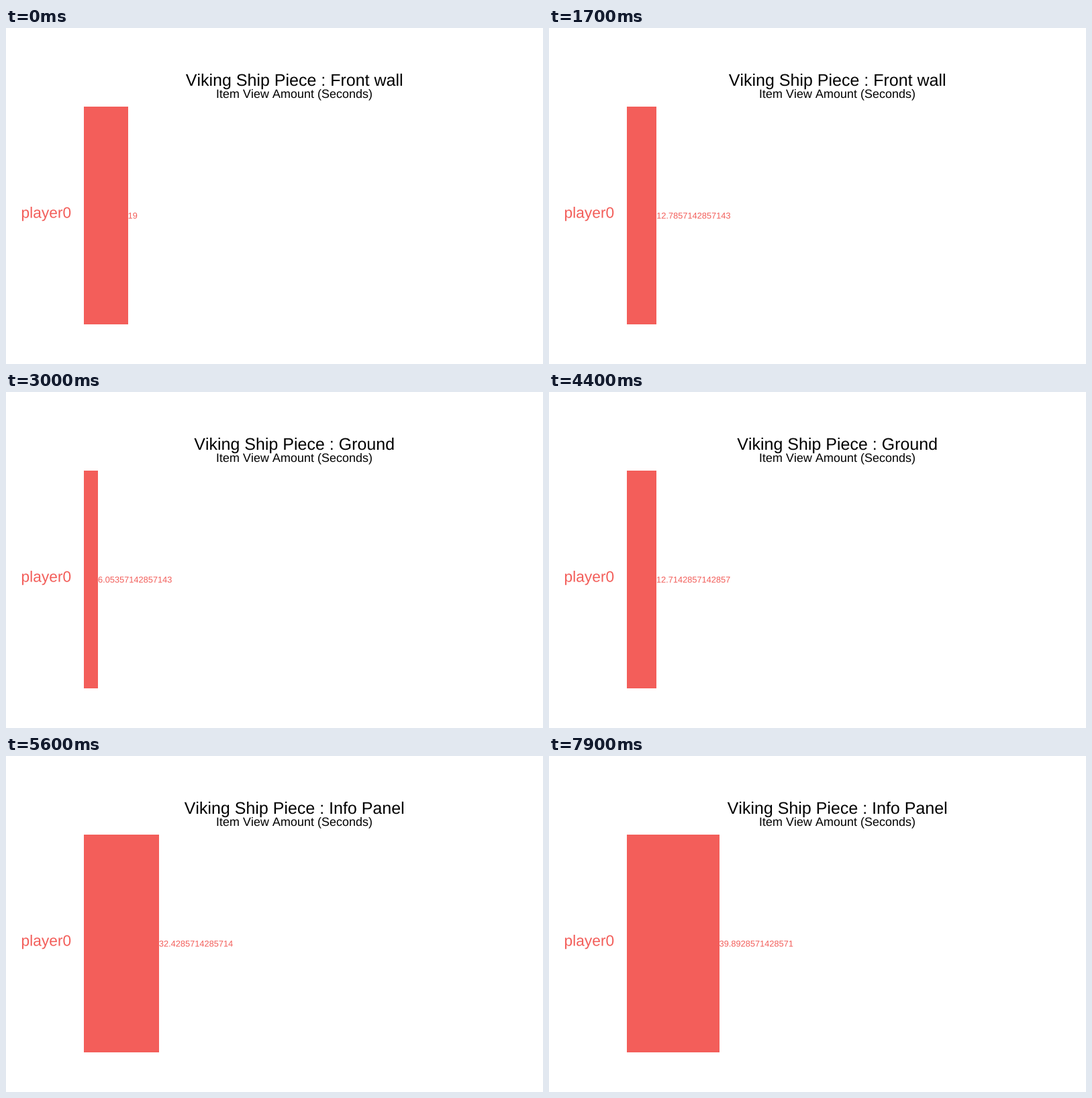
These frames come from a looping animation (800 by 500 pixels, 8000 ms). A matplotlib script:

```python
import math

import matplotlib.pyplot as plt
from matplotlib.animation import FuncAnimation
from matplotlib.patches import PathPatch, Rectangle
from matplotlib.path import Path
from matplotlib.textpath import TextPath

plt.rcParams["text.kerning_factor"] = 6  # plain advances, no pair kerning

WIDTH, HEIGHT, DPI = 800, 500, 100
STEP_MS, FRAMES = 100, 80
CORAL = "#F35E5A"

BAR_LEFT, BAR_TOP, BAR_BOTTOM = 116.14, 117, 441
PX_PER_SECOND = 3.445
PANEL_CENTER = 429.7

# Each state rests for 7 frames, then moves linearly to the next in 28 steps.
STATES = [("Front wall", 19), ("Ground", 4.5), ("Info Panel", 50.5), ("Exit", 1)]
FIRST_MOVE, CYCLE, MOVE_STEPS = 5, 34, 28

fig = plt.figure(figsize=(WIDTH / DPI, HEIGHT / DPI), dpi=DPI, facecolor="white")
ax = fig.add_axes([0, 0, 1, 1])
ax.set_xlim(0, WIDTH)
ax.set_ylim(0, HEIGHT)
ax.axis("off")


def outline(x, baseline, text, size):
    return TextPath((x, HEIGHT - baseline), text, size=size,
                    prop={"family": "Liberation Sans"})


def centered(center, baseline, text, size):
    path = outline(0, baseline, text, size)
    box = path.get_extents()
    shift = center - (box.x0 + box.x1) / 2
    return Path(path.vertices + [shift, 0], path.codes)


def add_text(path, color):
    return ax.add_patch(PathPatch(path, facecolor=color, linewidth=0, snap=False))


def title_path(piece):
    return centered(PANEL_CENTER - 0.8, 86, f"Viking Ship Piece : {piece}", 25)


def state_at(frame):
    index, step = divmod(frame - FIRST_MOVE, CYCLE)
    if index < 0:
        return STATES[0]
    step = min(step, MOVE_STEPS)
    (piece, start), (next_piece, end) = STATES[index:index + 2]
    value = start + (end - start) * step / MOVE_STEPS
    return (next_piece if step >= MOVE_STEPS / 2 else piece), value


bar = ax.add_patch(Rectangle((116, HEIGHT - BAR_BOTTOM), 0, BAR_BOTTOM - BAR_TOP,
                             facecolor=CORAL, linewidth=0))
add_text(centered(PANEL_CENTER, 104, "Item View Amount (Seconds)", 18), "black")
add_text(outline(22.5, 282.5, "player0", 22.76), CORAL)
title = add_text(title_path(STATES[0][0]), "black")
label = add_text(outline(0, 283.6, "0", 12.8), CORAL)


def draw(frame):
    piece, value = state_at(frame)
    edge = BAR_LEFT + PX_PER_SECOND * value
    bar.set_width(math.floor(edge + 0.5) - 116)
    label.set_path(outline(edge, 283.6, f"{value:.15g}", 12.8))
    title.set_path(title_path(piece))
    return bar, label, title


animation = FuncAnimation(fig, draw, frames=FRAMES, interval=STEP_MS,
                          repeat=True, repeat_delay=0)
plt.show()
```
